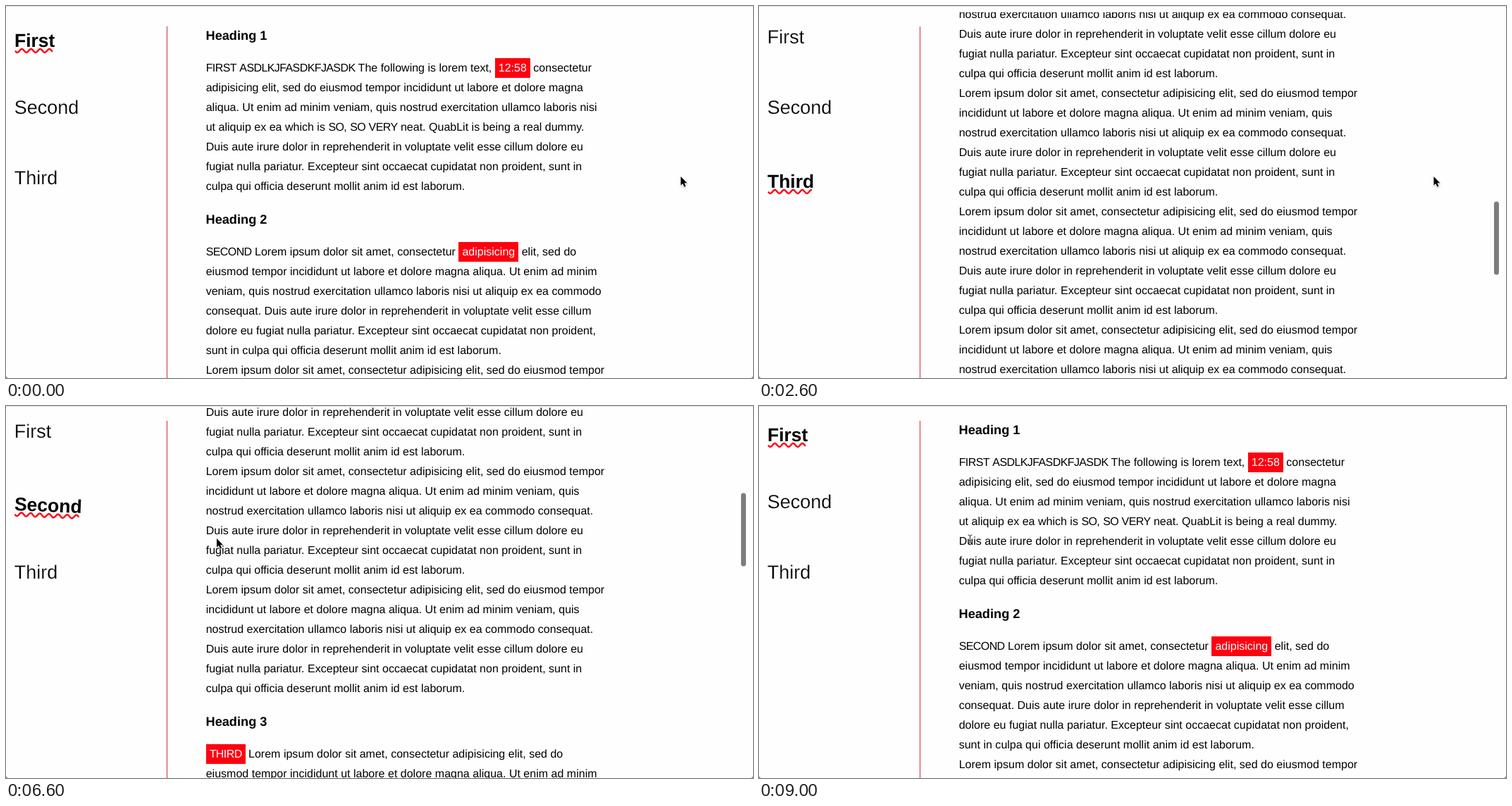
An HTML page with a canvas that plays this animation: 1060x528 px, repeating every 9.2 s.

```html
<!DOCTYPE html>
<html lang="en">
<head>
<meta charset="utf-8">
<title>Scrolling sections</title>
<style>
  html, body { margin: 0; width: 100%; height: 100%; overflow: hidden; background: #fefefe; }
  canvas { display: block; }
</style>
</head>
<body>
<canvas id="stage" width="1060" height="528"></canvas>
<script>
const ctx = document.getElementById('stage').getContext('2d');
const W = 1060, H = 528, LOOP = 9200, STEP = 200;
const PAPER = '#fefefe', RED = '#fe0010';
const FAMILY = '"Liberation Sans", Arial, sans-serif';

const LOREM = [
  'Lorem ipsum dolor sit amet, consectetur adipisicing elit, sed do eiusmod tempor',
  'incididunt ut labore et dolore magna aliqua. Ut enim ad minim veniam, quis',
  'nostrud exercitation ullamco laboris nisi ut aliquip ex ea commodo consequat.',
  'Duis aute irure dolor in reprehenderit in voluptate velit esse cillum dolore eu',
  'fugiat nulla pariatur. Excepteur sint occaecat cupidatat non proident, sunt in',
  'culpa qui officia deserunt mollit anim id est laborum.'
];
const TAIL = [
  'eiusmod tempor incididunt ut labore et dolore magna aliqua. Ut enim ad minim',
  'veniam, quis nostrud exercitation ullamco laboris nisi ut aliquip ex ea commodo',
  'consequat. Duis aute irure dolor in reprehenderit in voluptate velit esse cillum',
  'dolore eu fugiat nulla pariatur. Excepteur sint occaecat cupidatat non proident,',
  'sunt in culpa qui officia deserunt mollit anim id est laborum.'
];
const FIRST = [
  'FIRST ASDLKJFASDKFJASDK The following is lorem text, [12:58] consectetur',
  'adipisicing elit, sed do eiusmod tempor incididunt ut labore et dolore magna',
  'aliqua. Ut enim ad minim veniam, quis nostrud exercitation ullamco laboris nisi',
  'ut aliquip ex ea which is SO, SO VERY neat. QuabLit is being a real dummy.',
  ...LOREM.slice(3)
];
const repeat = n => Array(n).fill(LOREM).flat();
const SECTIONS = [
  FIRST,
  ['SECOND Lorem ipsum dolor sit amet, consectetur [adipisicing] elit, sed do', ...TAIL, ...repeat(3)],
  ['[THIRD] Lorem ipsum dolor sit amet, consectetur adipisicing elit, sed do', ...TAIL, ...repeat(8)]
];

// Lay the article out once: text, baseline, heading flag
const rows = [];
let base = 48;
SECTIONS.forEach((lines, i) => {
  rows.push({ text: 'Heading ' + (i + 1), y: base, heading: true });
  lines.forEach((text, k) => rows.push({ text, y: base + 45 + 28 * k }));
  base += 45 + 28 * (lines.length - 1) + 48;
});

// Scroll positions [ms, px], before and after the link is clicked
const CLICK = 5200;
const WHEEL_A = [[200, 0], [1000, 640], [1800, 1518], [2200, 1700], [2700, 1150], [3400, 0]];
const WHEEL_B = [[6200, 279], [6600, 584], [7400, 1715], [7600, 1760], [8400, 0]];
const LABELS = ['First', 'Second', 'Third'];
const ACTIVE = [[-1000, 0], [700, 1], [1400, 2], [2900, 1], [3200, 0],
                [6400, 1], [6800, 2], [7900, 1], [8100, 0]];

const clamp = v => Math.max(0, Math.min(1, v));
const ease = v => v * v * (3 - 2 * v);
const between = (t, a, b) => t >= a && t < b;

function slope(keys, i) {
  const a = keys[i - 1], b = keys[i], c = keys[i + 1];
  if (!a || !c || (b[1] - a[1]) * (c[1] - b[1]) <= 0) return 0;
  return (c[1] - a[1]) / (c[0] - a[0]);
}

function curve(keys, t) {
  const last = keys.length - 1;
  if (t <= keys[0][0]) return keys[0][1];
  if (t >= keys[last][0]) return keys[last][1];
  const i = keys.findIndex(k => k[0] > t) - 1;
  const [x0, y0] = keys[i], [x1, y1] = keys[i + 1];
  const d = x1 - x0, u = (t - x0) / d;
  return y0 + (y1 - y0) * ease(u)
    + slope(keys, i) * d * u * (1 - u) * (1 - u)
    - slope(keys, i + 1) * d * u * u * (1 - u);
}

function setFont(size, weight = '', spacing = 0) {
  ctx.font = `${weight} ${size}px ${FAMILY}`;
  ctx.letterSpacing = spacing + 'px';
}

// Words in capitals are set a little tighter; returns the pieces and their width
function shape(text) {
  let width = 0;
  const pieces = text.split(/([A-Z]{2,})/).map(part => {
    const spacing = /^[A-Z]{2,}$/.test(part) ? '-0.6px' : '0.01px';
    ctx.letterSpacing = spacing;
    const piece = { part, spacing, x: width };
    width += ctx.measureText(part).width;
    return piece;
  });
  return { pieces, width };
}

function drawShaped(pieces, x, y, color) {
  ctx.fillStyle = color;
  for (const p of pieces) {
    ctx.letterSpacing = p.spacing;
    ctx.fillText(p.part, x + p.x, y);
  }
}

function drawLine(text, y) {
  let x = 283.7;
  setFont(16);
  text.split(/[\[\]]/).forEach((part, i) => {
    const { pieces, width } = shape(part);
    const tagged = i % 2, pad = tagged ? 5 : 0;
    if (tagged) {
      const left = Math.round(x);
      ctx.fillStyle = RED;
      ctx.fillRect(left, y - 19, Math.round(x + width + 2 * pad) - left, 28);
    }
    drawShaped(pieces, x + pad, y, tagged ? '#fff' : '#000');
    x += width + 2 * pad;
  });
}

function drawArticle(scroll, shift) {
  ctx.save();
  ctx.beginPath();
  ctx.rect(240, 9 - shift, 800, H);
  ctx.clip();
  for (const row of rows) {
    const y = Math.round(row.y - scroll - shift);
    if (y < -20 || y > H + 24) continue;
    if (row.heading) {
      setFont(18.2, 'bold');
      ctx.fillStyle = '#000';
      ctx.fillText(row.text, 283.5, y);
    } else {
      drawLine(row.text, y);
    }
  }
  ctx.restore();
}

function squiggle(x0, x1, y) {
  ctx.beginPath();
  for (let x = x0; x <= x1; x++) {
    ctx.lineTo(x, y + 2.5 * Math.cos((x - 16) * 2 * Math.PI / 13));
  }
  ctx.strokeStyle = RED;
  ctx.lineWidth = 2.4;
  ctx.stroke();
}

// A thin edge in the paper colour gives the large labels a light weight
function drawLightLabel(text, x, y) {
  setFont(27);
  ctx.fillStyle = '#000';
  ctx.fillText(text, x, y);
  ctx.strokeStyle = PAPER;
  ctx.lineWidth = 0.25;
  ctx.strokeText(text, x, y);
}

function drawLabels(t, shift) {
  const [since, active] = ACTIVE.filter(a => a[0] <= t).pop();
  const age = t - since;
  const tilt = age < 900 ? 2.5 * Math.sin(age * 2 * Math.PI / 900) : 0;
  LABELS.forEach((text, i) => {
    const y = 53 + 100 * i - shift;
    if (i !== active) {
      drawLightLabel(text, 11.8, y);
      return;
    }
    setFont(26.5, 'bold');
    const w = ctx.measureText(text).width;
    ctx.save();
    ctx.translate(12 + w / 2, y - 3);
    ctx.rotate(tilt * Math.PI / 180);
    ctx.translate(-12 - w / 2, 3 - y);
    squiggle(13, 9 + w, y + 10.5);
    ctx.fillStyle = '#000';
    ctx.fillText(text, 12, y + 5);
    ctx.restore();
  });
  // Lower edge of the underline stays behind after "Third"
  if (between(t, 2900, 6200)) {
    ctx.save();
    ctx.beginPath();
    ctx.rect(0, 264 - shift, 100, 10);
    ctx.clip();
    squiggle(12, 72, 263.5 - shift);
    ctx.restore();
  }
}

function thumb(x, y, h, alpha) {
  ctx.globalAlpha = alpha;
  ctx.fillStyle = '#7d7d7d';
  ctx.beginPath();
  ctx.roundRect(x, y, 7, h, 3.5);
  ctx.fill();
  ctx.globalAlpha = 1;
}

const fade = (t, from, to) => t < from ? 0 : clamp((to - t) / 300);

function drawBars(t, scroll, shift) {
  const inner = t < CLICK ? fade(t, 400, 4000) : fade(t, 6200, 9000);
  if (inner) thumb(1043, 12 - shift + scroll / 4.89, 104, inner);
  const outer = fade(t, CLICK, 6200);
  if (outer) thumb(1051, 11, 508, outer);
}

function drawStatus() {
  ctx.save();
  ctx.shadowColor = 'rgba(0,0,0,.3)';
  ctx.shadowBlur = 4;
  ctx.fillStyle = '#e8e8e8';
  ctx.beginPath();
  ctx.roundRect(-4, 508, 280, 30, 4);
  ctx.fill();
  ctx.restore();
  setFont(12, '', 0.08);
  ctx.fillStyle = '#666';
  ctx.fillText('odris-macbook-air.local:5757/#secondParagraph', 5, 523);
}

const ARROW = new Path2D('M0 0V14L3.2 11L5.5 16.4L7.9 15.4L5.6 10.2H9.9Z');
const HAND = new Path2D('M3.2 9V2.2Q3.2 .8 4.3 .8T5.4 2.2V6.2Q6.4 5.2 7.4 6.4Q8.5 5.6 9.4 6.8' +
  'Q11.6 6.4 11.6 8.6V11Q11.4 13 10.2 14.4V16.4H4.4V14.6Q2.6 12.6 .8 9.8Q.2 8.2 1.6 8.2Z' +
  'M5.6 10V13M7.4 10V13M9.2 10V13');
const BEAM = new Path2D('M-3 -6Q0 -6 0 -4Q0 -6 3 -6M0 -4V4M-3 6Q0 6 0 4Q0 6 3 6M-1.5 2H1.5');

function drawCursor(t) {
  const go = ease(clamp((t - 3600) / 600)), back = ease(clamp((t - 5900) / 500));
  const x = 957.5 - 905.5 * go + 247 * back;
  const y = 242 - 104 * go + 50 * back;
  ctx.save();
  ctx.translate(x, y);
  if (between(t, 4400, 6000)) {
    ctx.translate(-4, 0);
    ctx.fillStyle = '#fff';
    ctx.fill(HAND);
    ctx.strokeStyle = '#111';
    ctx.lineWidth = 1;
    ctx.stroke(HAND);
  } else if (t >= 8600) {
    ctx.translate(0.5, 1);
    ctx.strokeStyle = '#222';
    ctx.lineWidth = 1;
    ctx.stroke(BEAM);
  } else {
    ctx.scale(0.9, 0.9);
    ctx.strokeStyle = '#fff';
    ctx.lineWidth = 2;
    ctx.shadowColor = 'rgba(0,0,0,.25)';
    ctx.shadowBlur = 2;
    ctx.shadowOffsetY = 1;
    ctx.stroke(ARROW);
    ctx.shadowColor = 'transparent';
    ctx.fillStyle = '#000';
    ctx.fill(ARROW);
  }
  ctx.restore();
}

function drawCorners() {
  ctx.fillStyle = '#777';
  ctx.beginPath();
  ctx.moveTo(0, H - 4);
  ctx.quadraticCurveTo(0, H, 4, H);
  ctx.lineTo(0, H);
  ctx.moveTo(W, H - 4);
  ctx.quadraticCurveTo(W, H, W - 4, H);
  ctx.lineTo(W, H);
  ctx.fill();
}

function draw(t) {
  const clicked = t >= CLICK;
  const shift = clicked ? 8 : 0;
  const scroll = curve(clicked ? WHEEL_B : WHEEL_A, t);
  ctx.lineJoin = 'round';
  ctx.textRendering = 'geometricPrecision';
  ctx.fillStyle = PAPER;
  ctx.fillRect(0, 0, W, H);
  drawArticle(scroll, shift);
  ctx.fillStyle = '#c9303f';
  ctx.fillRect(228, 29 - shift, 1, H);
  drawLabels(t, shift);
  drawBars(t, scroll, shift);
  ctx.fillStyle = '#dadada';
  ctx.fillRect(0, 0, W, 1);
  if (between(t, 4400, 6200)) drawStatus();
  drawCorners();
  drawCursor(t);
}

const start = performance.now();
function tick() {
  const t = (performance.now() - start) % LOOP;
  draw(Math.floor(t / STEP) * STEP);
  requestAnimationFrame(tick);
}
tick();
</script>
</body>
</html>
```
